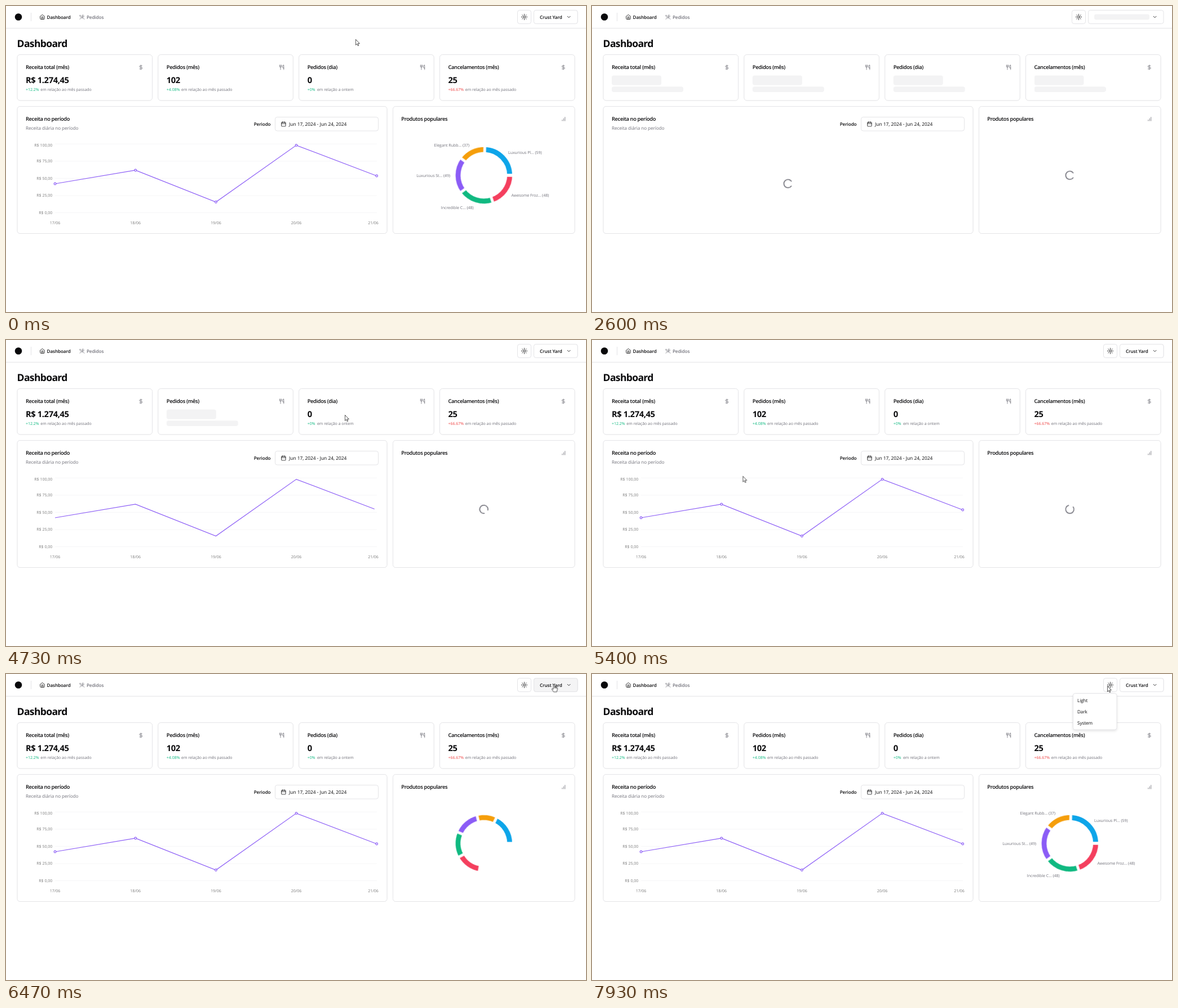
These frames come from a looping animation (1029 by 544 pixels, 8000 ms). An HTML page:

```html
<!DOCTYPE html>
<html lang="pt-BR">
<head>
<meta charset="utf-8">
<title>Dashboard</title>
<style>
html, body { margin: 0; width: 100%; height: 100%; overflow: hidden; background: #fff; }
svg { display: block; }
.stage {
  font-family: "Open Sans", "Noto Sans", sans-serif;
  text-rendering: geometricPrecision;
  fill: #09090b;
}

/* type */
.h1 { font-size: 17.5px; font-weight: 700; letter-spacing: -.64px; }
.title { font-size: 9.31px; font-weight: 600; letter-spacing: -.34px; }
.value { font-size: 14.7px; font-weight: 700; letter-spacing: -.37px; }
.label { font-size: 8.15px; font-weight: 600; letter-spacing: -.09px; }
.body { font-size: 8.15px; letter-spacing: -.06px; }
.date { font-size: 8.4px; }
.xs { font-size: 7.05px; letter-spacing: -.03px; }
.muted { fill: #71717a; }
.axis { font-size: 7.05px; fill: #7d7d7d; }
.up { fill: #10b981; }
.down { fill: #ef4444; }
.mid { text-anchor: middle; }
.end { text-anchor: end; }

/* surfaces */
.card { fill: #fff; stroke: #e4e4e7; filter: drop-shadow(0 .6px .6px rgba(0, 0, 0, .06)); }
.btn { fill: #fff; stroke: #e4e4e7; }
.cover { fill: #fff; }
.rule { stroke: #e4e4e7; }
.icon { fill: none; stroke: #09090b; stroke-width: 2; stroke-linecap: round; stroke-linejoin: round; }
.icon.soft { stroke: #71717a; }
.grid { stroke: #f4f4f5; stroke-width: .8; }
.bone { fill: #f3f3f4; animation: pulse 2s -1.5s cubic-bezier(.4, 0, .6, 1) infinite; }
.spin { fill: none; stroke: #71717a; stroke-width: 1.63; stroke-linecap: round; animation: spin 1s linear infinite; }

@keyframes pulse { 50% { opacity: .5; } }
@keyframes spin { from { transform: rotate(180deg); } to { transform: rotate(540deg); } }

/* content that arrives after the reload */
.load { animation: 8s step-end infinite; }
.shop { animation-name: shop; }
.revenue { animation-name: revenue; }
.month { animation-name: month; }
.day { animation-name: day; }
.cancel { animation-name: cancel; }
.chart { animation-name: chart; }
.dots { animation-name: dots; }
.pie { animation-name: pie; }
.names { animation-name: names; }
@keyframes shop { 0% { opacity: 1; } 32.5% { opacity: 0; } 51.625%, to { opacity: 1; } }
@keyframes revenue { 0% { opacity: 1; } 32.5% { opacity: 0; } 56.625%, to { opacity: 1; } }
@keyframes month { 0% { opacity: 1; } 32.5% { opacity: 0; } 62.5%, to { opacity: 1; } }
@keyframes day { 0% { opacity: 1; } 32.5% { opacity: 0; } 43.375%, to { opacity: 1; } }
@keyframes cancel { 0% { opacity: 1; } 32.5% { opacity: 0; } 45%, to { opacity: 1; } }
@keyframes chart { 0% { opacity: 1; } 32.5% { opacity: 0; } 42.4375%, to { opacity: 1; } }
@keyframes dots { 0% { opacity: 1; } 32.5% { opacity: 0; } 61.1875%, to { opacity: 1; } }
@keyframes pie { 0% { opacity: 1; } 32.5% { opacity: 0; } 67.8125%, to { opacity: 1; } }
@keyframes names { 0% { opacity: 1; } 32.5% { opacity: 0; } 91.5625%, to { opacity: 1; } }

/* charts drawing themselves */
.line { fill: none; stroke: #8b5cf6; stroke-width: 1.23; stroke-dasharray: 1 2; animation: draw 8s ease infinite; }
@keyframes draw {
  0%, 33% { stroke-dashoffset: 0; }
  34%, 42.4375% { stroke-dashoffset: 1; }
  61.1875%, to { stroke-dashoffset: 0; }
}
.slice { fill: none; stroke-width: 8.8; animation: open 8s ease infinite; }
.gap { stroke: #fff; stroke-width: 4.9; animation: turn 8s ease infinite; }
@keyframes open {
  0%, 33% { transform: rotate(var(--a)); stroke-dasharray: var(--l) 360; }
  34%, 72.8125% { transform: rotate(0deg); stroke-dasharray: 0 360; }
  91.5625%, to { transform: rotate(var(--a)); stroke-dasharray: var(--l) 360; }
}
@keyframes turn {
  0%, 33% { transform: rotate(var(--a)); }
  34%, 72.8125% { transform: rotate(0deg); }
  91.5625%, to { transform: rotate(var(--a)); }
}

/* hover, menu, pointer */
.hover { fill: #f4f4f5; stroke: #e4e4e7; opacity: 0; animation: 8s linear infinite; }
.hover-shop { animation-name: hover-shop; }
.hover-theme { animation-name: hover-theme; }
@keyframes hover-shop {
  0%, 73% { opacity: 0; }
  74.5%, 76% { opacity: 1; }
  77.6%, 78% { opacity: 0; }
  79.5%, 81.5% { opacity: 1; }
  83.3%, to { opacity: 0; }
}
@keyframes hover-theme {
  0%, 75.9% { opacity: 0; }
  77%, 77.5% { opacity: 1; }
  79%, 82.5% { opacity: 0; }
  84.4%, 94.125% { opacity: 1; }
  96%, to { opacity: 0; }
}
.menu { transform-box: fill-box; transform-origin: 100% 0; animation: menu 8s ease infinite; }
.menu rect { fill: #fff; stroke: #e4e4e7; filter: drop-shadow(0 2px 2px rgba(0, 0, 0, .1)); }
@keyframes menu {
  0%, 94% { opacity: 0; transform: translateY(-4.9px) scale(.95); }
  96%, to { opacity: 1; transform: none; }
}
.pointer { animation: move 8s ease-in-out infinite; }
.pointer path { fill: #fff; stroke: #111; stroke-width: .75; stroke-linejoin: round; }
.arrow { animation: arrow 8s step-end infinite; }
.hand { animation: hand 8s step-end infinite; }
@keyframes arrow {
  0% { opacity: 1; } 32.5% { opacity: 0; } 52.4% { opacity: 1; }
  73.125% { opacity: 0; } 94.125%, to { opacity: 1; }
}
@keyframes hand { 0% { opacity: 0; } 73.125% { opacity: 1; } 94.125%, to { opacity: 0; } }
@keyframes move {
  0% { transform: translate(620px, 59px); }
  7.5%, 32.5% { transform: translate(680px, 9px); }
  52.4% { transform: translate(640px, 6px); animation-timing-function: ease-out; }
  59.125% { transform: translate(601px, 133px); }
  65.5% { transform: translate(179px, 270px); }
  74.125%, 75% { transform: translate(967px, 18px); }
  75.875% { transform: translate(926px, 22px); }
  80% { transform: translate(977px, 18px); }
  84% { transform: translate(930px, 22px); }
  87.5%, 94% { transform: translate(924px, 21px); }
  98.7%, to { transform: translate(914px, 21px); }
}
</style>
</head>
<body>
<svg class="stage" width="1029" height="544">
  <defs>
    <symbol id="home" viewBox="0 0 24 24"><path d="m3 9 9-7 9 7v11a2 2 0 0 1-2 2H5a2 2 0 0 1-2-2zM9 22V12h6v10"/></symbol>
    <symbol id="crossed" viewBox="0 0 24 24"><path d="m16 2-2.3 2.3a3 3 0 0 0 0 4.2l1.8 1.8a3 3 0 0 0 4.2 0L22 8M15 15 3.3 3.3a4.2 4.2 0 0 0 0 6l7.3 7.3c.7.7 2 .7 2.8 0L15 15Zm0 0 7 7M2.1 21.8l6.4-6.3M19 5l-7 7"/></symbol>
    <symbol id="dollar" viewBox="0 0 24 24"><path d="M12 2v20M17 5H9.5a3.5 3.5 0 0 0 0 7h5a3.5 3.5 0 0 1 0 7H6"/></symbol>
    <symbol id="cutlery" viewBox="0 0 24 24"><path d="M3 2v7c0 1.1.9 2 2 2h4a2 2 0 0 0 2-2V2M7 2v20M21 15V2a5 5 0 0 0-5 5v6c0 1.1.9 2 2 2h3Zm0 0v7"/></symbol>
    <symbol id="bars" viewBox="0 0 24 24"><path d="M12 20V10M18 20V4M6 20v-4"/></symbol>
    <symbol id="calendar" viewBox="0 0 24 24"><path d="M5 4h14a2 2 0 0 1 2 2v14a2 2 0 0 1-2 2H5a2 2 0 0 1-2-2V6a2 2 0 0 1 2-2zM16 2v4M8 2v4M3 10h18"/></symbol>
    <symbol id="sun" viewBox="0 0 24 24"><circle cx="12" cy="12" r="4"/><path d="M12 2v2M12 20v2M4.93 4.93l1.41 1.41M17.66 17.66l1.41 1.41M2 12h2M20 12h2M6.34 17.66l-1.41 1.41M19.07 4.93l-1.41 1.41"/></symbol>
    <symbol id="chevron" viewBox="0 0 24 24"><path d="m6 9 6 6 6-6"/></symbol>
    <g id="bones">
      <rect x="35" y="123.5" width="88" height="17.2" rx="3.7"/>
      <rect x="35" y="143.2" width="127" height="9.8" rx="3.7"/>
    </g>
    <path id="arc" d="M7.36 0A7.36 7.36 0 1 1 2.27-7"/>
    <rect id="blank" class="cover" x="31" y="120" width="220" height="40"/>
  </defs>

  <!-- header -->
  <path class="rule" d="M0 39.5H1029M44.5 12V27"/>
  <circle cx="22" cy="19.5" r="6.3"/>
  <use class="icon" href="#home" x="59.6" y="14.6" width="9.8" height="9.8"/>
  <text class="label" x="72.6" y="22.6">Dashboard</text>
  <use class="icon soft" href="#crossed" x="130" y="14.6" width="9.8" height="9.8"/>
  <text class="label muted" x="142.9" y="22.6">Pedidos</text>

  <rect class="btn" x="851.5" y="7.5" width="24" height="24" rx="3.7"/>
  <use class="icon" href="#sun" x="857.6" y="13.6" width="11.8" height="11.8"/>
  <rect class="btn" x="880.5" y="7.5" width="133.5" height="24" rx="3.7"/>
  <rect class="bone" x="891" y="14.6" width="98" height="9.8" rx="3.7"/>
  <g class="load shop">
    <rect class="cover" x="846" y="3" width="146" height="33"/>
    <rect class="btn" x="907.5" y="7.5" width="24" height="24" rx="3.7"/>
    <rect class="btn" x="936.5" y="7.5" width="77.5" height="24" rx="3.7"/>
    <rect class="hover hover-theme" x="907.5" y="7.5" width="24" height="24" rx="3.7"/>
    <rect class="hover hover-shop" x="936.5" y="7.5" width="77.5" height="24" rx="3.7"/>
    <use class="icon" href="#sun" x="913.6" y="13.6" width="11.8" height="11.8"/>
    <text class="label" x="947" y="22.6">Crust Yard</text>
  </g>
  <use class="icon" href="#chevron" x="993.7" y="14.6" width="9.8" height="9.8"/>

  <text class="h1" x="19.6" y="72.8">Dashboard</text>

  <!-- metric cards -->
  <g>
    <rect class="card" x="20" y="86.5" width="239.5" height="81.5" rx="4.9"/>
    <text class="title" x="35" y="112.3">Receita total (mês)</text>
    <use class="icon soft" href="#dollar" x="234.4" y="104.1" width="9.8" height="9.8"/>
    <use class="bone" href="#bones"/>
    <g class="load revenue">
      <use href="#blank"/>
      <text class="value" x="35" y="137">R$ 1.274,45</text>
      <text class="xs up" x="35" y="151">+12.2%</text>
      <text class="xs muted" x="61.3" y="151">em relação ao mês passado</text>
    </g>
  </g>
  <g transform="translate(249.8)">
    <rect class="card" x="20" y="86.5" width="239.5" height="81.5" rx="4.9"/>
    <text class="title" x="35" y="112.3">Pedidos (mês)</text>
    <use class="icon soft" href="#cutlery" x="234.4" y="104.1" width="9.8" height="9.8"/>
    <use class="bone" href="#bones"/>
    <g class="load month">
      <use href="#blank"/>
      <text class="value" x="35" y="137">102</text>
      <text class="xs up" x="35" y="151">+4.08%</text>
      <text class="xs muted" x="61.3" y="151">em relação ao mês passado</text>
    </g>
  </g>
  <g transform="translate(499.7)">
    <rect class="card" x="20" y="86.5" width="239.5" height="81.5" rx="4.9"/>
    <text class="title" x="35" y="112.3">Pedidos (dia)</text>
    <use class="icon soft" href="#cutlery" x="234.4" y="104.1" width="9.8" height="9.8"/>
    <use class="bone" href="#bones"/>
    <g class="load day">
      <use href="#blank"/>
      <text class="value" x="35" y="137">0</text>
      <text class="xs up" x="35" y="151">+0%</text>
      <text class="xs muted" x="52.2" y="151">em relação a ontem</text>
    </g>
  </g>
  <g transform="translate(749.5)">
    <rect class="card" x="20" y="86.5" width="239.5" height="81.5" rx="4.9"/>
    <text class="title" x="35" y="112.3">Cancelamentos (mês)</text>
    <use class="icon soft" href="#dollar" x="234.4" y="104.1" width="9.8" height="9.8"/>
    <use class="bone" href="#bones"/>
    <g class="load cancel">
      <use href="#blank"/>
      <text class="value" x="35" y="137">25</text>
      <text class="xs down" x="35" y="151">+66.67%</text>
      <text class="xs muted" x="65.3" y="151">em relação ao mês passado</text>
    </g>
  </g>

  <!-- revenue chart -->
  <rect class="card" x="20" y="178.5" width="656" height="226" rx="4.9"/>
  <text class="title" x="35" y="204.3">Receita no período</text>
  <text class="body muted" x="35" y="219.7">Receita diária no período</text>
  <text class="label" x="439.7" y="213">Periodo</text>
  <rect class="btn" x="477.5" y="197.5" width="183" height="24.5" rx="3.7"/>
  <use class="icon" href="#calendar" x="487.5" y="205" width="9.8" height="9.8"/>
  <text class="date" x="502" y="213">Jun 17, 2024 - Jun 24, 2024</text>
  <g transform="translate(347.7 315.8)"><use class="spin" href="#arc"/></g>
  <g class="load chart">
    <rect class="cover" x="40" y="235" width="630" height="160"/>
    <path class="grid" d="M87 245.3H658M87 275.8H658M87 306.4H658M87 336.9H658M87 367.5H658"/>
    <g class="axis end">
      <text x="82.3" y="250">R$ 100,00</text>
      <text x="82.3" y="278.3">R$ 75,00</text>
      <text x="82.3" y="308.9">R$ 50,00</text>
      <text x="82.3" y="339.4">R$ 25,00</text>
      <text x="82.3" y="370">R$ 0,00</text>
    </g>
    <g class="axis mid">
      <text x="87" y="387.7">17/06</text>
      <text x="229.7" y="387.7">18/06</text>
      <text x="372.4" y="387.7">19/06</text>
      <text x="515" y="387.7">20/06</text>
      <text x="651.5" y="387.7">21/06</text>
    </g>
    <path class="line" pathLength="1" d="M87 316 229.7 292 372.4 348.5 515 247.6 657.7 302"/>
    <g class="load dots" fill="#fff" stroke="#8b5cf6" stroke-width="1.23">
      <circle cx="87" cy="316" r="1.84"/>
      <circle cx="229.7" cy="292" r="1.84"/>
      <circle cx="372.4" cy="348.5" r="1.84"/>
      <circle cx="515" cy="247.6" r="1.84"/>
      <circle cx="657.7" cy="302" r="1.84"/>
    </g>
  </g>

  <!-- popular products -->
  <rect class="card" x="686.5" y="178.5" width="322.5" height="226" rx="4.9"/>
  <text class="title" x="701.3" y="204.3">Produtos populares</text>
  <use class="icon soft" href="#bars" x="984.4" y="196" width="9.8" height="9.8"/>
  <g transform="translate(847.7 301)"><use class="spin" href="#arc"/></g>
  <g class="load pie">
    <rect class="cover" x="730" y="240" width="240" height="125"/>
    <g transform="translate(847.8 301) scale(1 -1)">
      <circle class="slice" r="45.8" pathLength="360" stroke="#0ea5e9" style="--a:0deg;--l:88.1"/>
      <circle class="slice" r="45.8" pathLength="360" stroke="#f59e0b" style="--a:88.1deg;--l:55.3"/>
      <circle class="slice" r="45.8" pathLength="360" stroke="#8b5cf6" style="--a:143.4deg;--l:73.2"/>
      <circle class="slice" r="45.8" pathLength="360" stroke="#10b981" style="--a:216.6deg;--l:71.7"/>
      <circle class="slice" r="45.8" pathLength="360" stroke="#f43f5e" style="--a:288.3deg;--l:71.7"/>
      <path class="gap" d="M38 0H53" style="--a:0deg"/>
      <path class="gap" d="M38 0H53" style="--a:88.1deg"/>
      <path class="gap" d="M38 0H53" style="--a:143.4deg"/>
      <path class="gap" d="M38 0H53" style="--a:216.6deg"/>
      <path class="gap" d="M38 0H53" style="--a:288.3deg"/>
      <path class="gap" d="M38 0H53" style="--a:360deg"/>
    </g>
    <g class="load names">
      <text class="xs muted" x="891" y="262.5">Luxurious Pl... (59)</text>
      <text class="xs muted end" x="822" y="250.2">Elegant Rubb... (37)</text>
      <text class="xs muted end" x="788" y="304">Luxurious St... (49)</text>
      <text class="xs muted end" x="829.7" y="361">Incredible C... (48)</text>
      <text class="xs muted" x="896.4" y="339">Awesome Froz... (48)</text>
    </g>
  </g>

  <g class="menu">
    <rect x="853.5" y="34.5" width="77.5" height="64.5" rx="3.7"/>
    <text class="body" x="861" y="50.2">Light</text>
    <text class="body" x="861" y="69.8">Dark</text>
    <text class="body" x="861" y="89.5">System</text>
  </g>

  <g class="pointer">
    <path class="arrow" d="M.4.4V10.4L2.7 8.3 4.3 11.8 5.8 11.1 4.3 7.7H7.4Z"/>
    <path class="hand" d="M-1.1 1.2a1.1 1.1 0 0 1 2.2 0V4.9l3.8.8q1.6.5 1.4 2.2L5.5 11 4.8 13.4H-.6L-3.6 9q-.5-1.4.8-1.5L-1.1 8.7ZM1.1 5V7M3 5.4V7.2M4.8 5.8V7.4"/>
  </g>
</svg>
</body>
</html>
```
